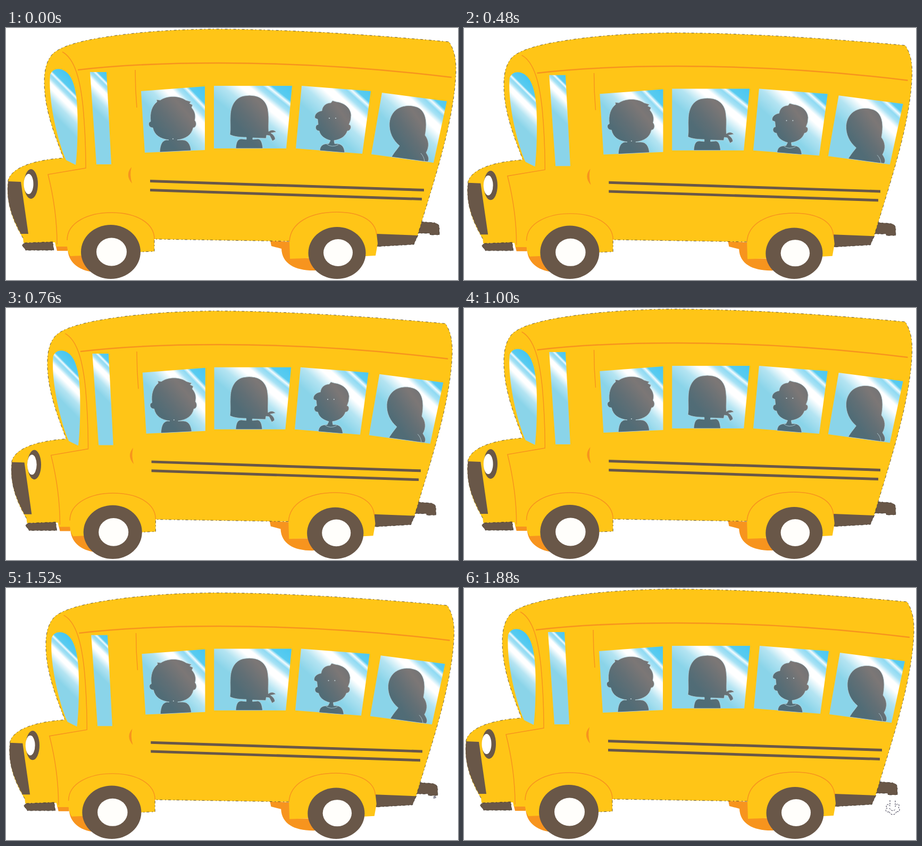
An HTML page for the animation above (1.92 s loop, 850 px wide and 475 px high).

```html
<!DOCTYPE html>
<html lang="en">
<head>
<meta charset="utf-8">
<title>School bus</title>
<style>
  html, body { margin: 0; width: 100%; height: 100%; overflow: hidden; background: #fff; }
  svg { display: block; width: 850px; height: 475px; }
  .body { fill: #ffc517; }
  .dark { fill: #695748; }
  .shade { fill: #f7941e; }
  .edge { stroke: #2a2622; stroke-width: .7; stroke-dasharray: 5 4 2 5; }
  .line { fill: none; stroke: #f7941e; stroke-width: 1.5; }
  .roof { stroke-width: 2.5; }
  .glass { fill: url(#glass); }
  .kid { fill: url(#kid); stroke: #b9d5dc; stroke-width: .8; }
  .fold { fill: none; stroke: #b9d5dc; stroke-width: .8; }
  .dot { fill: #cfdfe3; }
  .hub { fill: #fffefb; }
</style>
</head>
<body>
<svg viewBox="0 0 850 475">
  <defs>
    <linearGradient id="glass" x1="1" y1="0" x2="0" y2="1">
      <stop offset="0" stop-color="#48c7f1"/>
      <stop offset=".13" stop-color="#58cbf0"/>
      <stop offset=".16" stop-color="#f2fbfe"/>
      <stop offset=".19" stop-color="#8fdaf3"/>
      <stop offset=".23" stop-color="#a8e2f5"/>
      <stop offset=".28" stop-color="#fff"/>
      <stop offset=".34" stop-color="#fff"/>
      <stop offset=".45" stop-color="#b4e4f2"/>
      <stop offset=".6" stop-color="#8ad4e9"/>
      <stop offset="1" stop-color="#8ad4e9"/>
    </linearGradient>
    <linearGradient id="shield" href="#glass" gradientUnits="userSpaceOnUse" x1="108" y1="80" x2="23" y2="165"/>
    <linearGradient id="door" href="#glass" gradientUnits="userSpaceOnUse" x1="193" y1="83" x2="113" y2="163"/>
    <linearGradient id="kid" x1="1" y1="0" x2="0" y2="1">
      <stop offset="0" stop-color="#6b7175"/>
      <stop offset=".25" stop-color="#7c7776"/>
      <stop offset=".5" stop-color="#626f75"/>
      <stop offset=".7" stop-color="#516c76"/>
      <stop offset="1" stop-color="#4e6c77"/>
    </linearGradient>
  </defs>

  <g id="bus">
    <!-- underside and exhaust -->
    <path class="shade" d="M93 408L116 410L120 420H96ZM116 415C116 440 135 457 165 460L200 425ZM497 401L536 403L540 434L582 434V457C545 458 519 445 518 416L499 411Z"/>
    <path class="dark edge" d="M780 365L806 367Q815 369 815 377V390H797V387H774Z"/>
    <path class="dark edge" d="M696 387L775 390L767 408L698 412Z"/>

    <!-- shell, with its outer rim drawn apart from the fenders -->
    <path class="body" d="M108 245C93 205 72 155 72 102C72 80 76 64 85 52C96 38 124 29 158 22C230 8 320 2 400 2C550 3 700 14 833 26C844 42 847 62 846 86C842 180 804 290 774 391L697 388L699 406L695 429L676 430L534 435L533 402L279 398V421L255 422L145 429L121 430Q116 422 115 412L94 412L92 404L33 405L32 396C12 362 0 330 4 287C12 260 60 248 108 245Z"/>
    <path class="edge" fill="none" d="M32 396C12 362 0 330 4 287C12 260 60 248 108 245C93 205 72 155 72 102C72 80 76 64 85 52C96 38 124 29 158 22C230 8 320 2 400 2C550 3 700 14 833 26C844 42 847 62 846 86C842 180 804 290 774 391M533 402L279 398V421L255 422"/>

    <!-- front -->
    <path class="dark" d="M4 289L28 290L42 388H28C9 352 0 325 4 289Z"/>
    <path class="dark edge" d="M35 405L88 403L90 419H37L30 409Z"/>
    <ellipse class="dark" cx="47" cy="294" rx="13" ry="28"/>
    <ellipse cx="42.5" cy="294" rx="9" ry="19" fill="#fff"/>

    <!-- seams -->
    <path class="line roof" d="M135 79C220 69 310 66 400 66C560 66 700 76 838 93"/>
    <path class="line" d="M106 45C130 58 140 100 145 150C149 195 150 230 150 264L79 276C90 320 96 365 96 408"/>
    <path class="line" d="M243 79Q243 115 246 150M115 400C115 366 155 348 198 348C246 348 279 368 279 398M533 402C535 368 570 347 622 347C665 347 695 362 697 390"/>
    <path class="shade" d="M236 262Q223 277 237 293Q232 277 236 262Z"/>
    <path class="dark" d="M271 286L786 303V308L271 291ZM271 303L782 320V325L271 308Z"/>

    <!-- windows -->
    <path fill="url(#shield)" d="M83 88C87 78 96 76 104 78C125 84 134 115 134.500 165C135 200 134 235 131 258L113 249C96 210 79 135 83 88Z"/>
    <path fill="url(#door)" d="M158 83H189L198 257H170Z"/>
    <path class="glass" d="M254 119L374 110V230L261 235Z"/>
    <path class="glass" d="M391 109H538L527 227H391Z"/>
    <path class="glass" d="M556 109L686 119L670 237L545 227Z"/>
    <path class="glass" d="M707 122L829 138L804 254L687 238Z"/>

    <!-- passengers -->
    <path class="kid" d="M289 234C290 220 293 213 301 211L306 211C290 209 279 202 276 188C270 188 267 183 269 178L272 176C270 160 274 147 284 139L283 135L290 136C303 127 325 127 338 136L348 139L345 142L351 145L349 150C356 158 357 166 355 174C360 180 357 188 352 188C349 202 338 209 322 211L332 211C342 211 347 220 348 231Z"/>
    <path class="kid" d="M432 227C433 214 436 209 443 209L452 210V206C440 206 429 205 421 201C423 190 421 178 422 164C423 143 434 130 448 128Q458 126 468 128C483 131 492 143 493 158C495 172 493 182 494 195C499 191 505 192 508 196L498 198C503 201 507 206 506 210L501 213L496 203L490 202L489 208L464 207V210L474 209C480 210 482 217 483 227Z"/>
    <path class="kid" d="M590 231C591 222 595 218 607 218L610 212C599 209 591 203 589 194C581 194 580 183 587 182L586 172L581 170C579 163 586 157 594 156C595 146 603 141 611 141L614 137L621 139C637 141 648 151 649 164Q649 174 645 182C651 183 649 194 642 194C639 203 631 210 617 212L618 218C632 217 636 224 637 235Z"/>
    <path class="fold" d="M603 219Q613 226 625 220"/>
    <circle class="dot" cx="608" cy="170" r="1"/>
    <circle class="dot" cx="620" cy="170" r="1"/>
    <circle class="dot" cx="314" cy="209" r=".9"/>
    <path class="kid" d="M725 243C731 233 736 228 740 222C727 211 720 196 721 179C722 167 728 158 735 153C745 146 759 145 769 148C783 151 790 164 790 182C790 190 789 197 788 202C795 211 797 223 790 235C794 241 797 247 793 252L783 251Z"/>
    <path class="fold" d="M780 236Q786 242 787 251"/>

    <!-- wheels -->
    <ellipse class="dark" cx="197" cy="422" rx="56" ry="51"/>
    <ellipse class="hub" cx="198.500" cy="422" rx="28.500" ry="26.500"/>
    <ellipse class="dark" cx="622.500" cy="424" rx="54" ry="49"/>
    <ellipse class="hub" cx="624.500" cy="423.500" rx="27.500" ry="25.500"/>
  </g>

  <path id="puff" d="M801 400V411C797 404 791 411 796 415C789 418 796 425 800 421C800 429 813 429 813 421C819 424 821 416 817 414C821 407 814 404 811 412V400M800 415Q806 424 812 416" fill="none" stroke="#25223a" stroke-dasharray="3 2" vector-effect="non-scaling-stroke"/>
</svg>
<script>
  const STEP = 40, COUNT = 48;
  // Turning points, in steps: values alternate between full and squashed.
  const widthKeys = [0, 2, 4, 6, 8, 11, 13];
  const heightKeys = [0, 4, 8, 12, 17, 21, 25, 28, 32, 38, 41, 44, 47];
  const bus = document.getElementById("bus");
  const puff = document.getElementById("puff");

  function squash(keys, n) {
    const i = Math.min(keys.findLastIndex(k => k <= n), keys.length - 2);
    const p = (n - keys[i]) / (keys[i + 1] - keys[i]);
    return i % 2 ? 1 - p : p;
  }

  const scaleAt = (cx, cy, sx, sy) =>
    `translate(${cx} ${cy}) scale(${sx} ${sy}) translate(${-cx} ${-cy})`;

  function draw(now) {
    const n = Math.floor(now / STEP) % COUNT;
    const sx = 1 - 0.0165 * squash(widthKeys, n % 13);
    const sy = 1 - 0.015 * squash(heightKeys, n);
    bus.setAttribute("transform", scaleAt(425, 473, sx, sy));

    const grow = Math.max(0, (n - 36) / 11);
    puff.style.display = grow ? "" : "none";
    puff.setAttribute("transform", scaleAt(806, 390, grow, grow));
  }

  const start = performance.now();
  function tick() {
    draw(performance.now() - start);
    requestAnimationFrame(tick);
  }
  tick();
</script>
</body>
</html>
```
